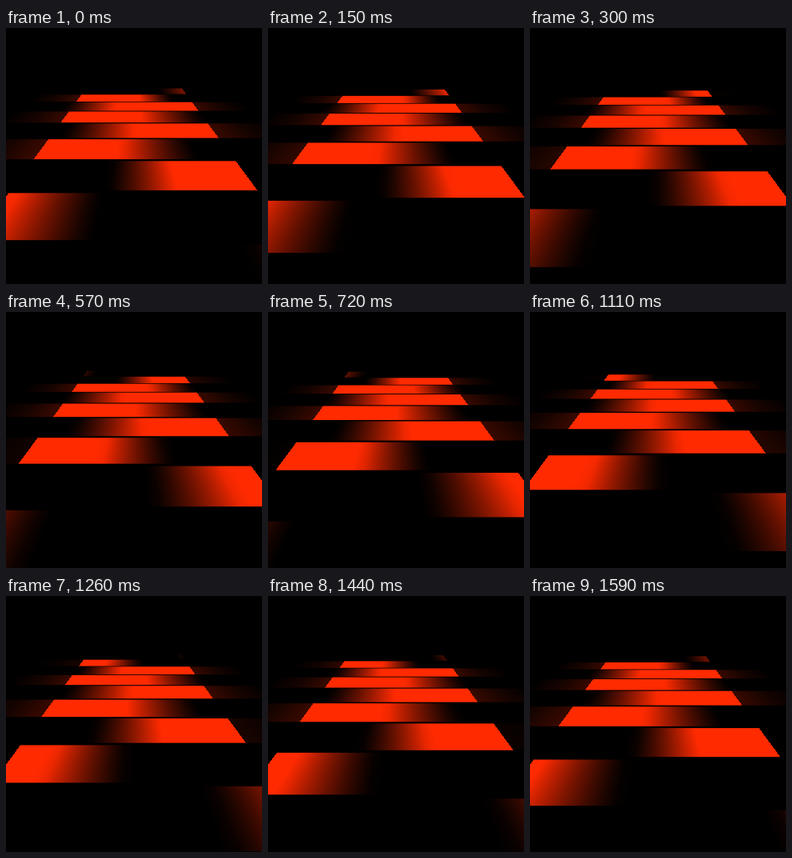
An HTML page with a canvas that plays this animation: 320x320 px, repeating every 1.62 s.

```html
<!DOCTYPE html>
<html lang="en">
<head>
<meta charset="utf-8">
<title>Red floor lights</title>
<style>
html, body { margin: 0; width: 100%; height: 100%; overflow: hidden; background: #000; }
canvas { display: block; }
</style>
</head>
<body>
<canvas id="stage" width="320" height="320"></canvas>
<script>
const ctx = document.getElementById('stage').getContext('2d');
const SIZE = 320, LOOP = 1620, STEP = 30;
const PITCH = 2.235;       // depth between strips on the same side
const HALF_LENGTH = 0.52;  // half a strip's depth
const SAMPLES = 24, REACH = 1.2;

// depth, where full brightness ends, where the fade ends (-1 = outer edge, 1 = far side)
const FADE = [
  [2.2, -1.9, -1.05], [3.2, -1.4, -0.65], [4.2, -0.95, -0.27], [5.35, -0.35, 0.22],
  [6.47, -0.15, 0.65], [7.59, 0, 0.88], [8.7, 0.1, 1], [9.82, 0.3, 1.15],
  [10.94, 0.1, 0.7], [11.27, -0.35, 0.35], [11.65, -0.75, -0.05],
  [12.06, -1.4, -0.5], [12.4, -1.6, -0.8], [12.8, -1.9, -1]
];

const clamp = v => Math.max(0, Math.min(1, v));
const screenY = depth => 1000 / depth - 4;
const halfWidth = y => 0.74 * (y + 5.5);
const red = level => `rgba(255,42,0,${level.toFixed(3)})`;

function fadeAt(depth) {
  let i = 1;
  while (i < FADE.length - 1 && FADE[i][0] < depth) i++;
  const a = FADE[i - 1], b = FADE[i];
  const k = clamp((depth - a[0]) / (b[0] - a[0]));
  return [a[1] + (b[1] - a[1]) * k, a[2] + (b[2] - a[2]) * k];
}

function stripStops(depth) {
  const [full, end] = fadeAt(depth);
  const glow = 0.22 * clamp(depth - 5.4) * clamp((11.7 - depth) / 0.6);
  const span = REACH + 2;
  const stops = [[0, red(0)], [0.15 / span, red(0)], [0.6 / span, red(glow * 0.4)], [1 / span, red(glow)]];
  for (let i = 0; i <= SAMPLES; i++) {
    const q = -1 + (REACH + 1) * i / SAMPLES;
    const level = clamp((end - q) / (end - full)) ** 1.25;
    stops.push([clamp((q + 2) / span), red(level)]);
  }
  return stops;
}

// side is 1 for strips lit from the left edge, -1 for the right
function drawStrip(depth, side) {
  const top = screenY(depth + HALF_LENGTH);
  const bottom = Math.min(SIZE, screenY(Math.max(0.5, depth - HALF_LENGTH)));
  const stops = stripStops(depth);
  for (let row = Math.floor(top); row < bottom; row++) {
    const y0 = Math.max(row, top), y1 = Math.min(row + 1, bottom);
    const w = halfWidth((y0 + y1) / 2) * side;
    const gradient = ctx.createLinearGradient(160 - 2 * w, 0, 160 + REACH * w, 0);
    for (const [at, color] of stops) gradient.addColorStop(at, color);
    ctx.fillStyle = gradient;
    ctx.fillRect(0, y0, SIZE, y1 - y0);
  }
}

function draw(time) {
  const phase = Math.floor((time % LOOP) / STEP) * STEP / LOOP;
  ctx.fillStyle = '#000';
  ctx.fillRect(0, 0, SIZE, SIZE);
  for (let i = 0; i < 13; i++) {
    const depth = 2 + (i - 1) * PITCH / 2 - phase * PITCH;
    const strip = depth + 6.47 - 2 - PITCH * 1.5;
    if (strip > 1.5 && strip < 12.8) drawStrip(strip, i % 2 ? -1 : 1);
  }
}

const start = performance.now();
function tick() {
  draw(performance.now() - start);
  requestAnimationFrame(tick);
}
draw(0);
requestAnimationFrame(tick);
</script>
</body>
</html>
```
